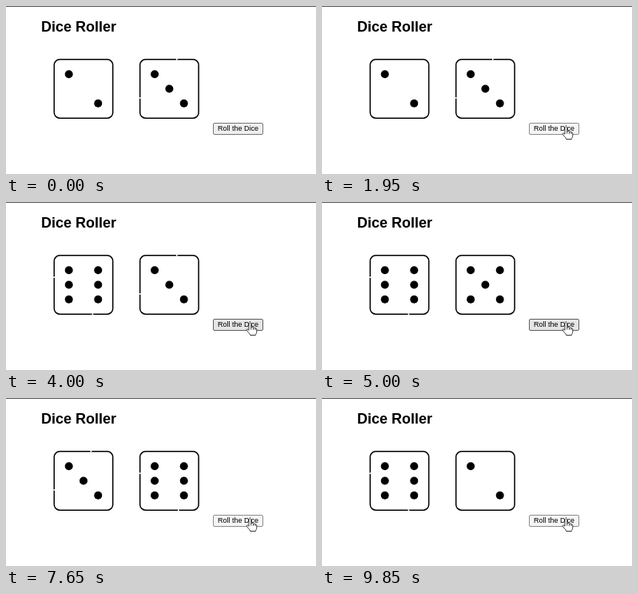
An HTML page with a canvas for the animation above (9.9 s loop, 388x210 px).

```html
<!DOCTYPE html>
<html lang="en">
<head>
<meta charset="utf-8">
<title>Dice Roller</title>
<style>
  html, body { margin: 0; width: 100%; height: 100%; overflow: hidden; background: #fff; }
  body { position: relative; font-family: "Liberation Sans", Arial, sans-serif; color: #000; }
  h1 { position: absolute; left: 44px; top: 17px; margin: 0; font-size: 18px; line-height: 18px; white-space: nowrap; }
  #roll {
    position: absolute; left: 259px; top: 146px; width: 63px; height: 15px;
    box-sizing: border-box; border: 1px solid #767676; border-radius: 2px; background: #efefef;
    font-size: 9px; line-height: 13px; text-align: center; white-space: nowrap;
  }
  #roll.over { background: #e5e5e5; border-color: #5f5f5f; }
  #roll.down { background: #f5f5f5; border-color: #8d8d8d; }
  canvas { position: absolute; left: 0; top: 0; }
</style>
</head>
<body>
<h1>Dice Roller</h1>
<div id="roll">Roll the Dice</div>
<canvas id="stage" width="388" height="210"></canvas>
<script>
const LOOP = 9900;
const HOLD = 100; // how long each click is held down
const ctx = document.getElementById('stage').getContext('2d');
const button = document.getElementById('roll');

// Release times; each release shows the next pair of faces
const clicks = [2050, 3800, 4900, 5700, 6400, 7100, 7750, 8500, 9050, 9950];
const leftFaces = '2666623356';
const rightFaces = '3235246632';

const hand = new Path2D(
  'M-1.5 8.8V.8C-1.5 -1.2 1.3 -1.2 1.3 .8V5.5C2 4.6 3.8 4.8 4 5.9C4.8 5.2 6.3 5.5 6.4 6.6' +
  'C7.2 6.1 8.3 6.6 8.3 7.7V10.5C8.3 12.6 7 13.5 6.8 15H.3C0 13 -3 11 -4.2 8.9' +
  'C-4.8 7.7 -3.2 6.8 -1.5 8.8ZM1.3 5.5V8M4 5.9V8.2M6.4 6.6V8.4');
const arrow = new Path2D('M0 0V13.5L3.1 10.7L5.3 15.8L7.5 14.9L5.3 9.9H9.5Z');

function pip(col, row) {
  ctx.beginPath();
  ctx.arc(col * 18.3, row * 18.3, 5, 0, 2 * Math.PI);
  ctx.fill();
}

function drawDie(x, y, n) {
  const r = 36.7;
  ctx.save();
  ctx.translate(x, y);
  ctx.strokeStyle = ctx.fillStyle = '#000';
  ctx.lineWidth = 1.5;
  ctx.beginPath();
  ctx.roundRect(-r, -r, 2 * r, 2 * r, 7);
  ctx.stroke();

  if (n % 2) pip(0, 0);
  for (const s of [-1, 1]) {
    if (n > 1) pip(s, s);
    if (n > 3) pip(s, -s);
    if (n === 6) pip(s, 0);
  }

  // The outline of 3 has two small breaks; 6 has the same ones a quarter turn round
  if (n % 3 === 0) {
    if (n === 6) ctx.rotate(-Math.PI / 2);
    ctx.fillStyle = '#fff';
    ctx.fillRect(8.6, -r - 1, 1.6, 2);
    ctx.fillRect(-r - 1, 10.6, 2, 1.6);
  }
  ctx.restore();
}

function drawPointer(path, x, y) {
  ctx.save();
  ctx.translate(x, y);
  ctx.fillStyle = '#fff';
  ctx.strokeStyle = '#222';
  ctx.lineWidth = 0.9;
  ctx.lineJoin = 'round';
  ctx.fill(path);
  ctx.stroke(path);
  ctx.restore();
}

function draw(t) {
  ctx.clearRect(0, 0, 388, 210);
  ctx.fillStyle = '#555';
  ctx.fillRect(0, 0, 388, 1);

  const turn = clicks.filter(c => c <= t).length;
  drawDie(97, 103.5, +leftFaces[turn]);
  drawDie(204.4, 103.5, +rightFaces[turn]);

  const k = Math.min(1, Math.max(0, (t - 50) / 800));
  const ease = 1 - (1 - k) ** 2;
  const y = 168 - 16.5 * ease;
  const over = y < 161;
  const down = t >= clicks[turn] - HOLD;
  button.className = down ? 'down' : over ? 'over' : '';
  if (t >= 50) drawPointer(over ? hand : arrow, 285 + 20.5 * ease, y);
}

const start = performance.now();
function tick() {
  draw((performance.now() - start) % LOOP);
  requestAnimationFrame(tick);
}
tick();
</script>
</body>
</html>
```
